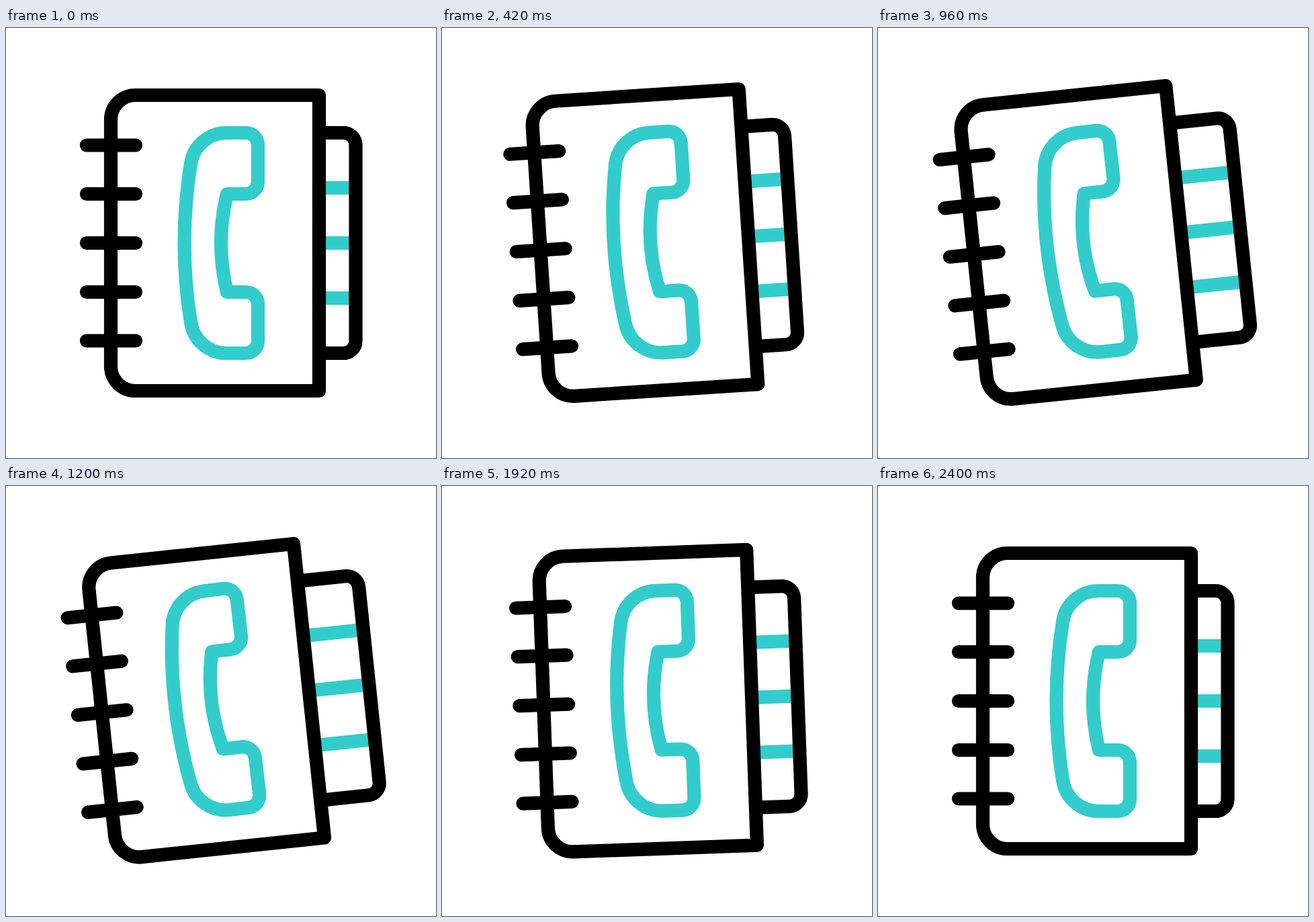
An HTML page that plays this animation: 640 by 640 pixels, repeating every 2720 ms.

```html
<!DOCTYPE html>
<html lang="en">
<head>
<meta charset="utf-8">
<title>Phone book</title>
<style>
  html, body { margin: 0; width: 100%; height: 100%; overflow: hidden; background: #fff; }
  svg { display: block; width: 100%; height: 100%; }
  path { fill: none; stroke: #000; stroke-width: 20.2; stroke-linejoin: round; }
  .teal { stroke: #33cccc; }
  .bars { stroke-linecap: round; }
</style>
</head>
<body>
<svg viewBox="0 0 640 640">
  <g id="book">
    <path id="stripes" class="teal"/>
    <path id="tab"/>
    <path d="M466 100H192.500A36.500 36.500 0 0 0 156 136.500V503.500A36.500 36.500 0 0 0 192.500 540H466Z"/>
    <path class="bars" d="M120 174.500h73M120 247h73M120 320h73M120 393h73M120 465.500h73"/>
    <path id="phone" class="teal" d="M328 156H357a18 18 0 0 1 18 18V229a18 18 0 0 1-18 18H329Q311 320 329 393H357a18 18 0 0 1 18 18V466a18 18 0 0 1-18 18H328A54 54 0 0 1 275 438Q256 320 275 202A54 54 0 0 1 328 156Z"/>
  </g>
</svg>
<script>
const LOOP = 2720, TILT = 6, SHIFT = 14.2, SLIDE = 35.5, SWAY = 0.6;
const [book, stripes, tab, phone] =
  ['book', 'stripes', 'tab', 'phone'].map(id => document.getElementById(id));

// Cubic bezier easing with control points (x1, 0) and (x2, 1)
const bezier = (x1, x2) => p => {
  let lo = 0, hi = 1, s = 0.5;
  for (let i = 0; i < 24; i++) {
    const x = 3 * (1 - s) ** 2 * s * x1 + 3 * (1 - s) * s * s * x2 + s ** 3;
    if (x < p) lo = s; else hi = s;
    s = (lo + hi) / 2;
  }
  return s * s * (3 - 2 * s);
};
const quick = bezier(1 / 3, 0.1), soft = bezier(0.5, 0.2);

const ramp = (t, start, end, ease) => {
  const p = (t - start) / (end - start);
  return p <= 0 ? 0 : p >= 1 ? 1 : ease(p);
};

function draw(now) {
  const t = now % LOOP;
  const back = ramp(t, 1650, 2400, quick);
  const tilt = TILT * (ramp(t, 60, 1120, quick) - back);
  const shift = SHIFT * (ramp(t, 60, 1020, quick) - back);
  const slide = SLIDE * (ramp(t, 190, 1305, quick) - ramp(t, 1560, 2400, soft));
  const sway = SWAY * (ramp(t, 700, 1250, soft) - ramp(t, 1300, 1900, soft));

  book.setAttribute('transform', `translate(${-shift}) rotate(${-tilt} 320 320)`);
  phone.setAttribute('transform', `rotate(${-sway} 320 320)`);
  tab.setAttribute('d',
    `M466 156H${502.5 + slide}a18 18 0 0 1 18 18V466a18 18 0 0 1-18 18H466`);
  stripes.setAttribute('d', [238, 320, 402].map(y => `M466 ${y}H${515 + slide}`).join(''));
  requestAnimationFrame(draw);
}
draw(performance.now());
</script>
</body>
</html>
```
